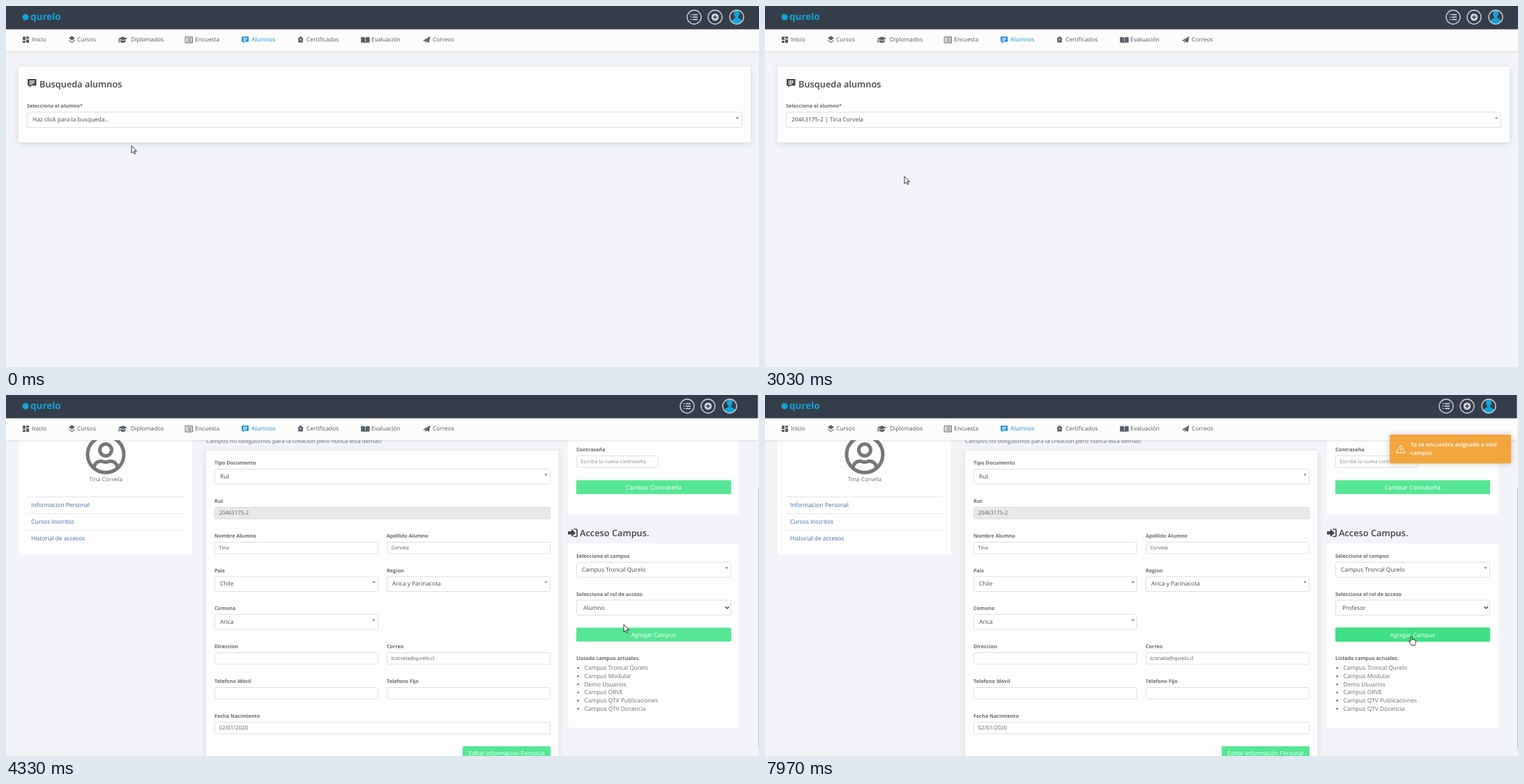
Recreate the animation shown at these times as an HTML page. Size 1080 by 519 pixels, loop 8000 ms.

```html
<!DOCTYPE html>
<html lang="es">
<head>
<meta charset="utf-8">
<title>Busqueda alumnos</title>
<style>
html, body { margin: 0; width: 100%; height: 100%; overflow: hidden; background: #f2f4f7; }
svg { display: block; width: 1080px; height: 519px; font: 8.4px "Open Sans", "Noto Sans", sans-serif; text-rendering: geometricPrecision; }
text { fill: #4a4a4a; white-space: pre; }
.nav { fill: #525a62; }
.on { fill: #1c8fd6; }
.h { font-size: 12.8px; font-weight: 600; fill: #434549; }
.label { font-size: 7.25px; font-weight: 700; fill: #6b6b6b; }
.in { font-size: 7.2px; fill: #5c5c5c; }
.num { font-size: 7.8px; fill: #5c5c5c; }
.hint { font-size: 7.2px; fill: #8b8b8b; }
.soft { fill: #707070; }
.link { fill: #3b6ca6; }
.white { fill: #fff; }
.toast { font-size: 8.05px; font-weight: 600; fill: #fff; }
.brand { font-size: 13.5px; font-weight: 700; fill: #12a4d6; }
.mid { text-anchor: middle; }
.card { fill: #fdfdfd; filter: drop-shadow(0 2px 4px #2a3a5026); }
.flat { fill: #fdfdfd; }
.field { fill: #fefefe; stroke: #dfe0e2; }
.off { fill: #e9e9e9; stroke: #dcdcdc; }
.btn { fill: #56e695; }
.line { stroke: #e6e8ec; fill: none; }

.step { animation: 8s step-end infinite; }
#search { animation-name: search; }
#profile, #bar { animation-name: profile; }
#tools { animation-name: tools; }
#list, #opened { animation-name: list; }
#hover { animation-name: hover; }
.row0 { animation-name: row0; }
.row2 { animation-name: row2; }
#empty { animation-name: empty; }
#picked { animation-name: picked; }
#roles { animation-name: roles; }
#mark { animation-name: mark; }
.role1 { animation-name: role1; }
.role2 { animation-name: role2; }
#old { animation-name: old; }
#new { animation-name: new; }
#press { animation-name: press; }
#arrow { animation-name: arrow; }
#hand { animation-name: hand; }
#page { animation: page 8s linear infinite; }
#thumb { animation: thumb 8s linear infinite; }
#toast { animation: toast 8s linear infinite; }
#mouse { animation: mouse 8s ease-in-out infinite; }

@keyframes search { 0% { opacity: 1 } 40%, 100% { opacity: 0 } }
@keyframes profile { 0% { opacity: 0 } 40%, 100% { opacity: 1 } }
@keyframes tools { 0% { transform: none } 40%, 100% { transform: translate(-10px, 0) } }
@keyframes list { 0% { opacity: 0 } 20.375% { opacity: 1 } 33.75%, 100% { opacity: 0 } }
@keyframes hover { 0% { transform: none } 26.4% { transform: translate(0, 18.7px) } 27.8%, 100% { transform: translate(0, 37.4px) } }
@keyframes row0 { 0% { fill: #fff } 26.4%, 100% { fill: #4a4a4a } }
@keyframes row2 { 0% { fill: #707070 } 27.8%, 100% { fill: #fff } }
@keyframes empty { 0% { opacity: 1 } 33.75%, 100% { opacity: 0 } }
@keyframes picked { 0% { opacity: 0 } 33.75%, 100% { opacity: 1 } }
@keyframes roles { 0% { opacity: 0 } 62.5% { opacity: 1 } 76.25%, 100% { opacity: 0 } }
@keyframes mark { 0% { transform: none } 69%, 100% { transform: translate(0, 10.8px) } }
@keyframes role1 { 0% { fill: #fff } 69%, 100% { fill: #444 } }
@keyframes role2 { 0% { fill: #444 } 69%, 100% { fill: #fff } }
@keyframes old { 0% { opacity: 1 } 76.25%, 100% { opacity: 0 } }
@keyframes new { 0% { opacity: 0 } 76.25%, 100% { opacity: 1 } }
@keyframes press { 0% { opacity: 0 } 78.2%, 100% { opacity: 1 } }
@keyframes arrow { 0% { opacity: 1 } 16.625% { opacity: 0 } 34.5% { opacity: 1 } 43.5% { opacity: 0 } 50.375% { opacity: 1 } 78.2%, 100% { opacity: 0 } }
@keyframes hand { 0% { opacity: 0 } 16.625% { opacity: 1 } 34.5% { opacity: 0 } 43.5% { opacity: 1 } 50.375% { opacity: 0 } 78.2%, 100% { opacity: 1 } }
@keyframes page { 0%, 44.125% { transform: none } 47.5%, 47.8% { transform: translate(0, -73px) } 50.375%, 100% { transform: translate(0, -176px) } }
@keyframes thumb { 0%, 44.125% { transform: none } 47.5%, 47.8% { transform: translate(0, 54px) } 50.375%, 100% { transform: translate(0, 130px) } }
@keyframes toast { 0%, 87.5% { opacity: 0 } 91.25%, 100% { opacity: .9 } }
@keyframes mouse {
  0%, 3% { transform: translate(180px, 201px) }
  10.4%, 16.6% { transform: translate(221px, 155px) }
  16.625%, 20.4% { transform: translate(227px, 156px) }
  25%, 25.8% { transform: translate(182px, 219px) }
  28.75%, 38.75% { transform: translate(200px, 245px) }
  43.75%, 48% { transform: translate(883px, 332px) }
  50.375%, 54.125% { transform: translate(886px, 330px) }
  58.375%, 65.875% { transform: translate(1002px, 309px) }
  71.25%, 76.5% { transform: translate(900px, 332px) }
  80.875%, 100% { transform: translate(927px, 347px) }
}
</style>
</head>
<body>
<svg id="stage" viewBox="0 0 1080 519"></svg>
<script>
const text = (x, y, s, c = '') => `<text x="${x}" y="${y}" class="${c}">${s}</text>`;
const rect = (x, y, w, h, c, r = 2) => `<rect x="${x}" y="${y}" width="${w}" height="${h}" rx="${r}" class="${c}"/>`;
const path = (d, fill = '#59626b', more = '') => `<path d="${d}" fill="${fill}" ${more}/>`;
const group = (id, s, c = 'step') => `<g id="${id}" class="${c}">${s}</g>`;
const at = (x, y, s) => `<g transform="translate(${x} ${y})">${s}</g>`;
const stroke = (d, color, w = 1) => path(d, 'none', `stroke="${color}" stroke-width="${w}" stroke-linecap="round" stroke-linejoin="round"`);

const caret = (x, y) => path(`M${x - 2.3} ${y}h4.6l-2.3 2.8z`, '#888');
const box = (x, y, w, h, c = 'field') => rect(x + .5, y + .5, w - 1, h - 1, c);
const input = (x, y, w, s = '', c = 'in', kind) => box(x, y, w, 17.5, kind) + text(x + 6.5, y + 11.4, s, c);
const select = (x, y, w, s) => box(x, y, w, 22.5) + text(x + 8, y + 13.7, s) + caret(x + w - 6.5, y + 7.5);
const label = (x, y, s) => text(x, y, s, 'label');
const button = (x, y, w, s) => rect(x, y, w, 20, 'btn', 1) + text(x + w / 2, y + 13, s, 'white mid');

const student = { first: 'Tina', last: 'Corvela', id: '20463175-2' };
const name = `${student.first} ${student.last}`;
const choice = `${student.id} | ${name}`;
const campus = ['Campus Troncal Qurelo', 'Campus Modular', 'Demo Usuarios', 'Campus ORVE',
  'Campus QTV Publicaciones', 'Campus QTV Docencia'];

const chat = c => path('M0 0h10v7.5H4L2 10V7.5H0zM2 1.8v1h6v-1zM2 3.6v1h6v-1zM2 5.4v1h4v-1z', c, 'fill-rule="evenodd"');

const searchCard = (w, value) => rect(18, 87, w, 109, 'card') +
  at(31, 105, `<g transform="scale(1.25)">${chat('#434549')}</g>`) +
  text(48, 117, 'Busqueda alumnos', 'h') + label(30, 146, 'Selecciona el alumno*') +
  box(30, 152, w - 24, 23) + value + caret(w - 1, 160);

function searchList() {
  const rows = ['Haz click para la busqueda...', '22222222-2 | Gestor Planificador', choice,
    '16390427-5 | Nestor Palvira', '14782036-1 | Elvira Zumarel', '13920458-K | Ramiro Tolez'];
  const cls = ['row0 step', 'soft', 'row2 step'];
  return '<rect x="1044" y="155" width="10" height="16" fill="#fefefe"/>' + path('M1047 163h6.6l-3.3-3.6z', '#888') +
    '<rect x="30.5" y="175.5" width="1025" height="143.5" fill="#fefefe" stroke="#b9bcc0"/>' +
    box(33, 181, 1020, 18) + stroke('M36.5 185.5v9', '#555', .8) +
    '<rect x="31" y="201" width="1014" height="18.7" fill="#ddd"/>' +
    group('hover', '<rect x="31" y="201" width="1014" height="18.7" fill="#5897fb"/>') +
    rows.map((s, i) => text(35, 213 + i * 18.7, s, cls[i] || 'soft')).join('') +
    '<rect x="1045" y="201" width="10" height="117" fill="#f1f1f1"/><rect x="1046.5" y="211" width="7.5" height="10" fill="#c1c1c1"/>' +
    path('M1048 207.5h4.6l-2.3-2.6z', '#888') + path('M1048 311.5h4.6l-2.3 2.6z', '#444');
}

function person() {
  const ring = (y, r) => `<circle cx="143" cy="${y}" r="${r}" fill="none" stroke="#777" stroke-width="5"/>`;
  return rect(18, 34, 249, 196, 'flat') + ring(85.5, 26) + ring(79, 8.5) +
    stroke('M126 104q2-9 11-9q6 3 12 0q9 0 11 9', '#777', 5) + text(143, 124, name, 'soft mid') +
    ['Informacion Personal', 'Cursos Inscritos', 'Historial de accesos'].map((s, i) =>
      `<path class="line" d="M30 ${146.5 + i * 24}h226"/>` + text(36, 160.8 + i * 24, s, 'link')).join('');
}

function form() {
  const a = 299, b = 546, w = 235, full = 482;
  return path('M287 40q0-1 1-1h13.5q1 0 1 1v10.5q0 1-1 1h-13.5q-1 0-1-1zM291 43a1.8 1.8 0 1 0 .1 0zM289 49h4.5q0-2-2.2-2t-2.3 2zM296 43v1.2h4.5v-1.2zM296 46v1.2h4.5v-1.2z', '#434549', 'fill-rule="evenodd"') +
    text(306, 50, 'Edición alumno.', 'h') +
    text(287, 68.5, 'Campos no obligatorios para la creación pero nunca esta demas!', 'soft') +
    rect(287, 80, 505.5, 480, 'card') +
    label(a, 100, 'Tipo Documento') + select(a, 106, full, 'Rut') +
    label(a, 154.5, 'Rut') + input(a, 161, full, student.id, 'num', 'off') +
    label(a, 204.5, 'Nombre Alumno') + input(a, 211, w, student.first) +
    label(b, 204.5, 'Apellido Alumno') + input(b, 211, w, student.last) +
    label(a, 254.5, 'Pais') + select(a, 260.5, w, 'Chile') +
    label(b, 254.5, 'Region') + select(b, 260.5, w, 'Arica y Parinacota') +
    label(a, 309, 'Comuna') + select(a, 315, w, 'Arica') +
    label(a, 363.5, 'Direccion') + input(a, 370, w) +
    label(b, 363.5, 'Correo') + input(b, 370, w, 'tcorvela@qurelo.cl') +
    label(a, 413.5, 'Telefono Móvil') + input(a, 420, w) +
    label(b, 413.5, 'Telefono Fijo') + input(b, 420, w) +
    label(a, 463.5, 'Fecha Nacimiento') + input(a, 470, full, '02/01/2020', 'num') +
    button(655, 505, 126, 'Editar Información Personal');
}

function access() {
  const x = 818, w = 222;
  return '<circle cx="815" cy="43" r="3" fill="none" stroke="#434549" stroke-width="3.6"/>' + stroke('M812 46l-5 5h3v-2', '#434549', 2.2) +
    text(823, 50, 'Cambio Contraseñas.', 'h') + rect(806, 61, 245.5, 111, 'flat') +
    label(x, 81, 'Contraseña') + input(x, 87, 118, 'Escribe la nueva contraseña', 'hint') +
    button(x, 122.5, w, 'Cambiar Contraseña') +
    path('M806 196h5v-3.5l6 5.8l-6 5.8v-3.5h-5z', '#434549') + stroke('M815 193h3q1 0 1 1v8.5q0 1-1 1h-3', '#434549', 1.7) +
    text(823, 203, 'Acceso Campus.', 'h') + rect(806, 213.5, 245.5, 264.5, 'flat') +
    label(x, 233.8, 'Selecciona el campus') + select(x, 240, w, campus[0]) +
    label(x, 288.5, 'Selecciona el rol de acceso') + box(x, 294.5, w, 22.5) +
    group('old', text(828, 309, 'Alumno')) + group('new', text(828, 309, 'Profesor')) +
    stroke('M1032.2 304.8l2.2 2.3l2.2-2.3', '#444', 1.4) +
    button(x, 334.5, w, 'Agregar Campus') +
    group('press', '<rect x="818" y="334.5" width="222" height="20" rx="1" fill="#3fe086"/>' + text(929, 347.5, 'Agregar Campus', 'white mid')) +
    label(x, 380.5, 'Listado campus actuales.') +
    campus.map((s, i) => `<circle cx="820.5" cy="${392.5 + i * 11.7}" r="1.2" fill="#555"/>` + text(829.5, 395.3 + i * 11.7, s, 'soft')).join('');
}

const roles = () => '<rect x="818.5" y="295" width="221" height="21.5" rx="2" fill="none" stroke="#8d9194"/>' +
  '<rect x="818.5" y="317.5" width="221.5" height="21.5" fill="#fff" stroke="#333" style="filter:drop-shadow(0 1px 2px #0006)"/>' +
  group('mark', '<rect x="819" y="318" width="220.5" height="10.2" fill="#1e90ff" stroke="#111" stroke-width="1.4"/>') +
  text(828, 325.6, 'Alumno', 'role1 step') + text(828, 336.2, 'Profesor', 'role2 step');

function header() {
  const icons = [
    [24, 44, path('M0 0h4v5H0zM5 0h4v3H5zM0 6h4v3H0zM5 4h4v5H5z')],
    [90, 43, path('M4.5 0L9 3.3L4.5 6.6L0 3.3zM0 5.4l4.5 3.3L9 5.4v1.4L4.5 10L0 6.8z')],
    [161, 44, path('M0 2.7L6.7 0l6.7 2.7l-6.7 2.7zM3 4.8l3.7 1.4l3.7-1.4v3q-3.7 2.4-7.4 0zM.8 3.5h1l.4 5H.4z')],
    [257, 44, stroke('M.5.5h10v8.5H.5zM2.3 2.7h.5M2.3 4.8h.5M2.3 6.9h.5M4.3 2.7h4.5M4.3 4.8h4.5M4.3 6.9h4.5', '#59626b')],
    [338, 44, chat('#1c8fd6')],
    [418, 43.5, path('M4.5 0L9 4H7.8v5H1.2V4H0zM4.5 3.2L3.2 5.8h2.6z', '#59626b', 'fill-rule="evenodd"')],
    [509, 44, path('M0 1q3.5-1 6 .4v8q-2.5-1.4-6-.6zM12.6 1q-3.5-1-6 .4v8q2.5-1.4 6-.6z')],
    [598, 43.5, path('M0 6.2L10.5 0L8.8 9.2L5.3 7.8L3.6 10V7L8.8 2L2.6 7.2z')]
  ];
  const items = [[37, 'Inicio'], [102, 'Cursos'], [179, 'Diplomados'], [271, 'Encuesta'], [352, 'Alumnos'],
    [431, 'Certificados'], [524, 'Evaluación'], [612, 'Correos']];
  const circle = x => `<circle cx="${x}" cy="16" r="10" fill="none" stroke="#cfd3d8" stroke-width="1.4"/>`;
  const tools = circle(987) + stroke('M982.5 12.5h.2M982.5 16h.2M982.5 19.5h.2M985.5 12.5h6M985.5 16h6M985.5 19.5h6', '#dfe2e6', 1.6) +
    circle(1017) + '<circle cx="1017" cy="16" r="5.2" fill="#d6d9dd"/>' + stroke('M1014.5 16h5M1017 13.5v5', '#363d4a', 1.4) +
    path('M1040 22q2-4 6-4.5v-2q-2.5-2-2-6q1-3 4-3t4 3q.5 4-2 6v2q4 .5 6 4.5q-3 4-8 4t-8-4z', '#12a4d6') + circle(1048);
  return '<rect y="33" width="1080" height="32" fill="#fcfcfb" style="filter:drop-shadow(0 1px 1px #0000001c)"/>' +
    '<rect width="1080" height="33.5" fill="#363d4a"/>' +
    '<circle cx="28" cy="16" r="4.5" fill="#12a4d6"/>' + text(35, 20, 'qurelo', 'brand') +
    icons.map(i => at(...i)).join('') +
    items.map(([x, s]) => text(x, 51.3, s, s === 'Alumnos' ? 'on' : 'nav')).join('') + group('tools', tools);
}

const toast = () => '<rect x="896" y="57" width="174" height="41.5" rx="2" fill="#f29d28" style="filter:drop-shadow(0 0 4px #8888)"/>' +
  stroke('M912 72.5l6.3 10.5h-12.6zM912 76.5v3M912 81.2v.1', '#fff') +
  text(926, 74, 'Ya se encuentra asignado a este', 'toast') + text(926, 86, 'campus.', 'toast');

const mouse = group('arrow', path('M0 0v10.5l2.5-2.3l1.7 3.6l1.7-.8l-1.7-3.5h3.4z', '#fff', 'stroke="#222" stroke-width=".9"')) +
  group('hand', path('M-1 .8q1-1.5 2 0v4q1-.9 1.9.2q1-.7 1.8.3q1.4-.4 1.6.9v3q-.4 1.5-1.2 2.4v1.2h-5.2v-1q-1.7-2-3.3-4.5q.2-1.6 1.5-.6l.9 1z', '#fff', 'stroke="#222" stroke-width=".9" stroke-linejoin="round"'));

document.getElementById('stage').innerHTML =
  '<rect width="1080" height="519" fill="#f2f4f7"/>' +
  group('search', searchCard(1050,
    group('empty', text(38, 166, 'Haz click para la busqueda...')) + group('picked', text(38, 166, choice)))) +
  group('list', searchList()) +
  group('profile', group('page',
    searchCard(1040, text(38, 166, choice)) + at(0, 176, person() + form() + access()), '')) +
  group('roles', roles()) + header() +
  group('bar', '<rect x="1078.5" width="1.5" height="519" fill="#f4f4f4"/>' +
    '<rect id="thumb" x="1079" y="4" width="1" height="375" fill="#bfc2c6"/>') +
  group('toast', toast(), '') + group('mouse', mouse, '');
</script>
</body>
</html>
```
